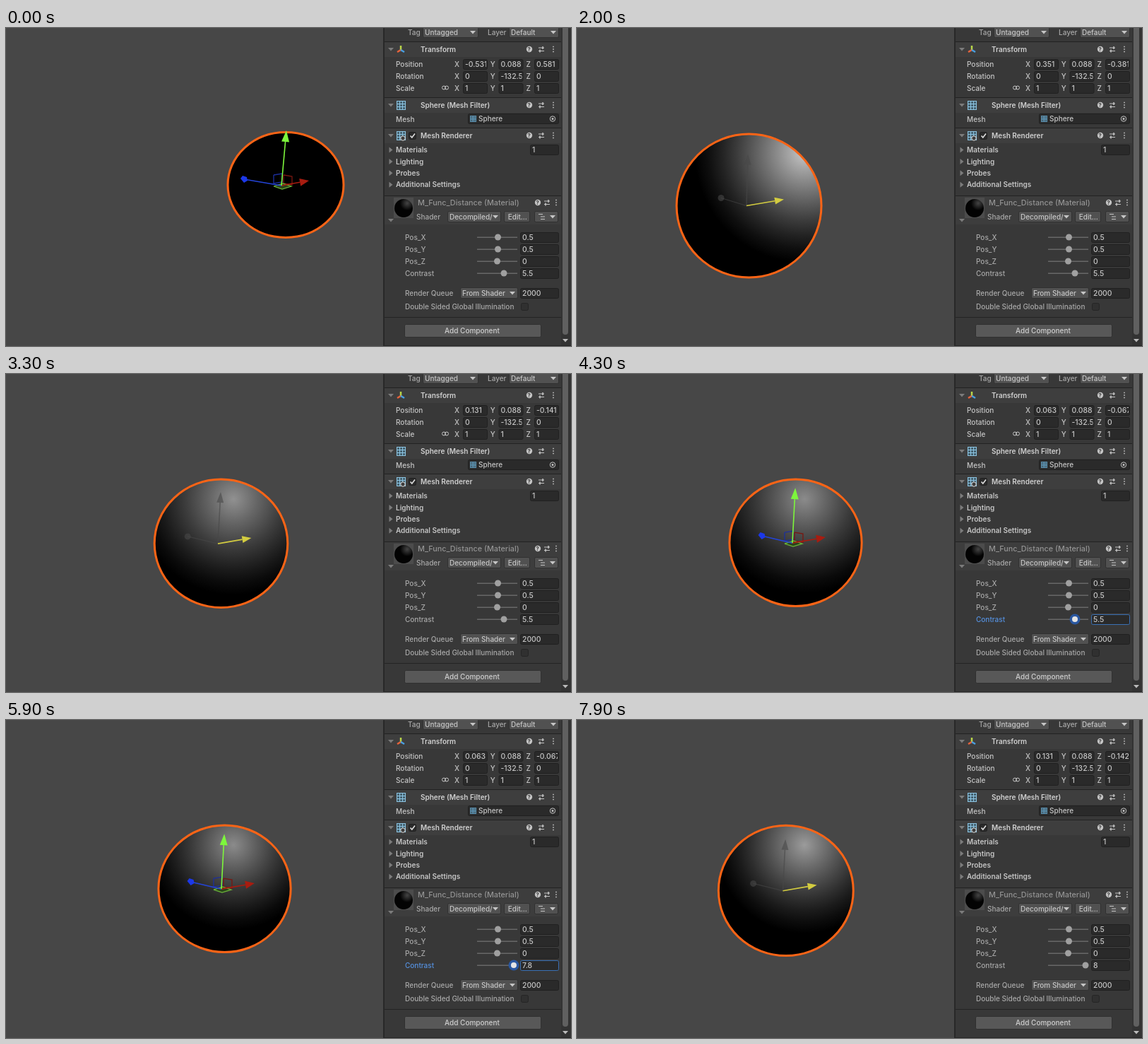
These frames come from a looping animation (800x450 px, 8000 ms). An HTML page with a canvas:

```html
<!DOCTYPE html>
<html lang="en">
<head>
<meta charset="utf-8">
<title>Distance shader</title>
<style>
html, body { margin: 0; width: 100%; height: 100%; overflow: hidden; background: #474747; }
canvas { display: block; width: 800px; height: 450px; }
</style>
</head>
<body>
<canvas id="stage" width="800" height="450"></canvas>
<script>
const ctx = document.getElementById('stage').getContext('2d');
const LOOP = 8000, STEP = 100;
const INK = '#c6c6c6', DIM = '#a9a9a9';

// Tracks of [time, value], linear between the points
const travel = [[0, 0], [600, 0], [900, .07], [1100, .131], [1400, .4], [1800, .82], [2000, 1],
  [2300, 1.6], [2500, 1.77], [2700, 1.57], [3000, 1.05], [3300, .6], [3500, .567],
  [7300, .567], [7700, .69], [7900, .657]];
const position = [[0, -.531], [600, -.531], [900, -.455], [1100, -.384], [1400, -.16], [1800, .2],
  [2000, .351], [2300, .92], [2500, 1.18], [2700, 1.05], [3000, .55], [3300, .131], [3500, .063],
  [7300, .063], [7700, .165], [7900, .1314]];
const contrast = [[0, 5.5], [4300, 5.5], [5200, 7.2], [6100, 8]];

function at(track, t) {
  const i = track.findIndex(k => k[0] > t);
  if (i < 0) return track[track.length - 1][1];
  const [t0, v0] = track[i - 1], [t1, v1] = track[i];
  return v0 + (v1 - v0) * (t - t0) / (t1 - t0);
}

function rect(x, y, w, h, fill, stroke, r = 2) {
  ctx.beginPath();
  ctx.roundRect(x, y, w, h, r);
  if (fill) { ctx.fillStyle = fill; ctx.fill(); }
  if (stroke) { ctx.strokeStyle = stroke; ctx.lineWidth = 1; ctx.stroke(); }
}

function poly(points, fill, stroke, width = 1) {
  ctx.beginPath();
  points.forEach(([x, y]) => ctx.lineTo(x, y));
  if (fill) { ctx.fillStyle = fill; ctx.fill(); }
  if (stroke) { ctx.strokeStyle = stroke; ctx.lineWidth = width; ctx.stroke(); }
}

function dot(x, y, r, fill, stroke) {
  ctx.beginPath();
  ctx.arc(x, y, r, 0, 7);
  if (fill) { ctx.fillStyle = fill; ctx.fill(); }
  if (stroke) { ctx.strokeStyle = stroke; ctx.lineWidth = 1; ctx.stroke(); }
}

// y is the middle of the capitals
function text(str, x, y, color = INK, weight = 500, size = 10) {
  ctx.font = `${weight} ${size}px Inter, sans-serif`;
  ctx.fillStyle = color;
  ctx.fillText(str, x, y + size * .36);
}

function field(x, y, w, str, border = '#202020') {
  rect(x + .5, y - 6.5, w - 1, 14, '#2a2a2a', border);
  ctx.save();
  ctx.beginPath();
  ctx.rect(x, y - 8, w - 2, 16);
  ctx.clip();
  text(str, x + 3, y, INK, 500, 10.4);
  ctx.restore();
}

const down = (x, y, c = INK) => poly([[x - 4, y - 2], [x + 4, y - 2], [x, y + 2.5]], c);
const right = (x, y) => poly([[x - 2.5, y - 4], [x + 2.5, y], [x - 2.5, y + 4]], '#7c7c7c');

function button(x, y, w, str, arrow) {
  rect(x + .5, y - 7.5, w - 1, 15, '#515151', '#303030');
  ctx.save();
  ctx.beginPath();
  ctx.rect(x, y - 8, arrow ? w - 13 : w, 16);
  ctx.clip();
  text(str, x + 3, y);
  ctx.restore();
  if (arrow) down(x + w - 8, y);
}

function tools(x, y, gap) {
  dot(x, y, 4.2, '#c4c4c4');
  text('?', x - 2.4, y, '#383838', 700, 7.5);
  const u = x + gap, v = x + 2 * gap;
  for (const [dy, k] of [[-2, 2], [2.5, -2]]) {
    poly([[u - 4, y + dy], [u + 4, y + dy]], null, INK);
    poly([[u + k, y + dy - 2], [u + k, y + dy + 2]], null, INK, 1.5);
  }
  for (const dy of [-3.5, 0, 3.5]) rect(v - .8, y + dy - .8, 1.6, 1.6, INK, null, 0);
}

function grid(x, y, size, color) {
  rect(x, y, size + 1, size + 1, '#44606e', null, 1);
  ctx.strokeStyle = color;
  ctx.lineWidth = 1;
  ctx.beginPath();
  for (let i = 0; i < 4; i++) {
    const d = Math.round(size * i / 3) + .5;
    ctx.moveTo(x + d, y); ctx.lineTo(x + d, y + size + 1);
    ctx.moveTo(x, y + d); ctx.lineTo(x + size + 1, y + d);
  }
  ctx.stroke();
}

function header(y, title) {
  rect(536, y - 11, 251, 22, '#3e3e3e', null, 0);
  rect(536, y - 11, 251, 1, '#222', null, 0);
  down(545, y, '#7c7c7c');
  text(title, 587, y, '#d0d0d0', 600);
  tools(741, y, 17);
}

function slider(name, y, x, value, active) {
  text(name, 565, y, active ? '#5591e0' : DIM);
  rect(667, y - .5, 57, 1.5, '#686868', null, 0);
  if (active) dot(x, y, 7.5, '#2a57a0');
  dot(x, y, active ? 4 : 4.5, active ? '#e4e4e4' : '#a0a0a0');
  field(728, y, 55, value, active ? '#3a70b4' : undefined);
}

function inspector(t) {
  rect(534, 0, 266, 450, '#383838', null, 0);
  rect(534, 0, 2, 450, '#282828', null, 0);

  text('Tag', 569, 6, DIM);
  button(590, 6, 79, 'Untagged', true);
  text('Layer', 682, 6, DIM);
  button(712, 6, 71, 'Default', true);

  header(30, 'Transform');
  poly([[559, 31], [559, 25]], null, '#b9d64a', 2.5);
  poly([[559, 31], [554, 34]], null, '#e8643c', 2.5);
  poly([[559, 31], [564, 34]], null, '#4a9fe0', 2.5);
  const p = at(position, t);
  const rows = [
    ['Position', p.toFixed(3), '0.088', (.581 - 1.091 * (p + .531)).toFixed(3)],
    ['Rotation', '0', '-132.5', '0'],
    ['Scale', '1', '1', '1']
  ];
  rows.forEach(([name, ...values], i) => {
    const y = 51 + 17 * i;
    text(name, 552, y);
    values.forEach((v, j) => {
      text('XYZ'[j], 635 + 50.7 * j, y);
      field(647 + 50.5 * j, y, 35, v);
    });
  });
  rect(617.5, 82, 5, 5, null, INK, 2.5);
  rect(621.5, 82, 5, 5, null, INK, 2.5);

  header(109, 'Sphere (Mesh Filter)');
  grid(553, 103, 12, '#8cc4e2');
  text('Mesh', 552, 129);
  field(654, 128, 129, '');
  grid(657, 124, 8, '#5a8fae');
  text('Sphere', 669, 128.5);
  dot(774, 128.5, 3.7, null, INK);
  dot(774, 128.5, 1.5, INK);

  header(152, 'Mesh Renderer');
  grid(553, 146, 12, '#8cc4e2');
  dot(562, 156, 3.2, '#3e3e3e', '#ddd');
  rect(570.5, 147.5, 10, 10, '#2a2a2a', '#202020');
  poly([[572.5, 152.5], [574.8, 155], [579, 149.5]], null, '#ddd', 1.6);
  ['Materials', 'Lighting', 'Probes', 'Additional Settings'].forEach((name, i) => {
    const y = 172.5 + 16.4 * i;
    right(545, y);
    text(name, 552, y, INK, 600);
  });
  field(742, 172, 41, '1');

  rect(536, 237, 251, 41, '#3d3d3d', null, 0);
  rect(536, 237, 251, 1, '#222', null, 0);
  rect(549, 240, 28, 29, '#4c4c4c', null, 0);
  const shine = ctx.createRadialGradient(568, 248, 0, 568, 248, 10);
  shine.addColorStop(0, '#444');
  shine.addColorStop(1, '#030303');
  dot(563, 255, 13, shine);
  down(545, 272, '#7c7c7c');
  text('M_Func_Distance (Material)', 583, 247, '#939393', 500, 10.8);
  tools(753, 247, 13);
  text('Shader', 581, 267.5, DIM);
  button(625, 267, 76, 'Decompiled/A', true);
  button(705, 267, 37, ' Edit...');
  button(748, 267, 34, '', true);
  poly([[754, 263.5], [760, 263.5]], null, INK);
  poly([[757, 267], [763, 267]], null, INK);
  poly([[757, 270.5], [763, 270.5]], null, INK);

  slider('Pos_X', 296, 696.5, '0.5');
  slider('Pos_Y', 313, 696.5, '0.5');
  slider('Pos_Z', 330, 695.5, '0');
  const c = at(contrast, t);
  slider('Contrast', 347, 672 + 6 * c, String(+c.toFixed(1)), t >= 4200 && t < 7200);

  text('Render Queue', 565, 375.5, DIM);
  button(643, 375, 82, 'From Shader', true);
  field(728, 375, 55, '2000');
  text('Double Sided Global Illumination', 565, 394, DIM);
  rect(729.5, 389.5, 10, 10, '#303030', '#252525');

  rect(536, 409, 251, 1, '#242424', null, 0);
  rect(564.5, 419.5, 193, 18, '#585858', '#303030');
  text('Add Component', 621, 428.5, '#d0d0d0');

  rect(786, 0, 14, 450, '#333', null, 0);
  rect(788, -8, 8, 442, '#606060', null, 4);
  down(792, 442, '#bbb');
  rect(534, 449, 266, 1, '#252525', null, 0);
}

function arrow(x, y, dx, dy, color, head, half, alpha = 1) {
  const len = Math.hypot(dx, dy), ux = dx / len, uy = dy / len;
  const bx = x + dx - ux * head, by = y + dy - uy * head;
  ctx.globalAlpha = alpha;
  poly([[x, y], [bx, by]], null, color, 1.6);
  poly([[x + dx, y + dy], [bx - uy * half, by + ux * half], [bx + uy * half, by - ux * half]], color);
  ctx.globalAlpha = 1;
}

function gizmo(s, dragging) {
  const x = 390 - 150 * s, y = 223 + 28.5 * s;
  const up = [7 - 5 * s, dragging ? -73 : -78];
  const side = [-53 + 17 * s, -9 - 2 * s];
  const front = [39 + 14 * s, -7 - 2 * s];
  const sx = x + side[0], sy = y + side[1];
  if (dragging) {
    arrow(x, y, ...up, '#484848', 15, 5, .6);
    ctx.globalAlpha = .6;
    poly([[x, y], [sx, sy]], null, '#484848', 1.3);
    dot(sx, sy, 4.5, '#484848');
    ctx.globalAlpha = 1;
    arrow(x, y, ...front, '#d3cc40', 13, 5);
    return;
  }
  const square = (dx, skew, color) => {
    const left = x + dx, top = y - 15;
    poly([[left, top], [left + 12, top + skew], [left + 12, top + 12 + skew],
      [left, top + 12], [left, top]], null, color, 1.3);
  };
  square(-11, -2, '#1c2f9e');
  square(3, 2, '#7a1710');
  poly([[x - 11, y + 1], [x + 2, y - 3], [x + 14, y + 1], [x + 1, y + 5], [x - 11, y + 1]], '#2c451a', '#6ab53a', 1.3);
  poly([[x, y], [sx, sy]], null, '#2444d8', 1.5);
  poly([[sx - 5, sy - 1], [sx - 2, sy - 5], [sx + 4, sy - 3], [sx + 5, sy + 2], [sx, sy + 5]], '#1c38e8');
  arrow(x, y, ...front, '#a81c10', 13, 5.5);
  arrow(x, y, ...up, '#7df63c', 16, 5.5);
}

function ball(s, c) {
  const x = 396 - 152.5 * s, y = 222 + 29.5 * s, rx = 82.5 + 20.5 * s, ry = 75 + 27 * s;
  const glow = Math.max(0, 1.2 * s - .42 * s * s);
  const reach = (70 + 145 * s - 60 * s * s) * (5.5 / c) ** .3;
  const light = ctx.createRadialGradient(322, 177, 0, 322, 177, reach);
  for (let i = 0; i <= 8; i++) {
    const d = i / 8, v = Math.round(255 * glow * (1 - d) ** 1.25);
    light.addColorStop(d, `rgb(${v},${v},${v})`);
  }
  ctx.beginPath();
  ctx.ellipse(x, y, rx - .5, ry - .5, 0, 0, 7);
  ctx.fillStyle = light;
  ctx.fill();
  ctx.strokeStyle = '#fb6416';
  ctx.lineWidth = 3;
  ctx.stroke();
}

function draw(now) {
  const t = Math.floor(now % LOOP / STEP) * STEP;
  const s = at(travel, t);
  rect(0, 0, 800, 450, '#474747', null, 0);
  ball(s, at(contrast, t));
  gizmo(s, (t >= 500 && t < 3700) || t >= 7300);
  inspector(t);
  requestAnimationFrame(draw);
}
requestAnimationFrame(draw);
</script>
</body>
</html>
```
